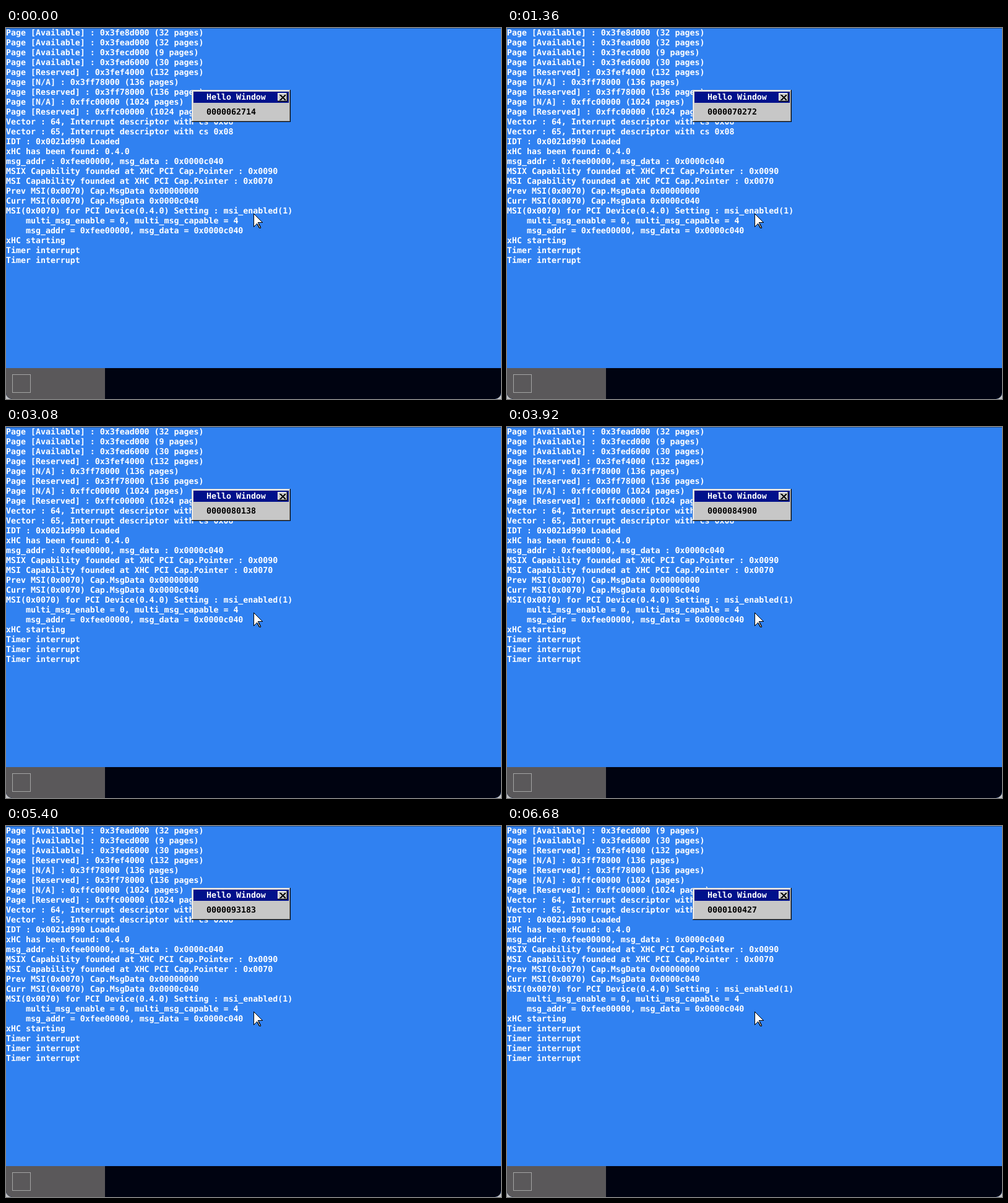
These frames come from a looping animation (800 by 600 pixels, 6.72 s). An HTML page:

```html
<!DOCTYPE html>
<html lang="en">
<head>
<meta charset="utf-8">
<title>Hello Window</title>
<style>
  html, body { margin: 0; width: 100%; height: 100%; overflow: hidden; background: #c4c4c6; }
  svg { display: block; width: 800px; height: 600px; }
  text {
    font: bold 13.288px "DejaVu Sans Mono", "Liberation Mono", monospace;
    white-space: pre;
    text-rendering: geometricPrecision;
    font-variant-ligatures: none;
  }
  #console { fill: #fff; }
</style>
</head>
<body>
<svg viewBox="0 0 800 600">
  <clipPath id="screen"><path d="M0 0H800V590A10 10 0 0 1 790 600H10A10 10 0 0 1 0 590Z"/></clipPath>
  <g clip-path="url(#screen)">
    <rect width="800" height="600" fill="#3081f1"/>
    <g id="console"></g>
    <rect width="800" height="1" fill="#1d4f94"/>
    <rect y="550" width="800" height="50" fill="#000311"/>
    <rect y="550" width="160" height="50" fill="#5a585a"/>
    <rect x="10.5" y="560.5" width="29" height="29" fill="none" stroke="#a5a5a5"/>
  </g>
  <g id="window" transform="translate(300 100)">
    <g id="frame" shape-rendering="crispEdges"></g>
    <path d="M142 8h2l3 3 3-3h2v1l-3.500 3.500 3.500 3.500v1h-2l-3-3-3 3h-2v-1l3.500-3.500-3.500-3.500z" fill="#000" shape-rendering="crispEdges"/>
    <text x="24" y="16" fill="#fff">Hello Window</text>
    <text id="counter" x="24" y="40" fill="#000"></text>
  </g>
  <path transform="translate(400.5 300.5)" shape-rendering="crispEdges" fill="#fff" stroke="#000"
    d="M0 0L14 14H7V15L8 16L11 22V23H9L6 17L5 16L4 17L0 21Z"/>
</svg>
<script>
const LOOP = 6720, STEP = 40, ROWS = 24, ROW_HEIGHT = 16;
const scrollTimes = [1720, 5600];
const counts = [[0, 62714], [1360, 70272], [2240, 75376], [3920, 84900],
                [4760, 89574], [5720, 94987], [6680, 100427]];

const log = `Page [Available] : 0x3fe8d000 (32 pages)
Page [Available] : 0x3fead000 (32 pages)
Page [Available] : 0x3fecd000 (9 pages)
Page [Available] : 0x3fed6000 (30 pages)
Page [Reserved] : 0x3fef4000 (132 pages)
Page [N/A] : 0x3ff78000 (136 pages)
Page [Reserved] : 0x3ff78000 (136 pages)
Page [N/A] : 0xffc00000 (1024 pages)
Page [Reserved] : 0xffc00000 (1024 pages)
Vector : 64, Interrupt descriptor with cs 0x08
Vector : 65, Interrupt descriptor with cs 0x08
IDT : 0x0021d990 Loaded
xHC has been found: 0.4.0
msg_addr : 0xfee00000, msg_data : 0x0000c040
MSIX Capability founded at XHC PCI Cap.Pointer : 0x0090
MSI Capability founded at XHC PCI Cap.Pointer : 0x0070
Prev MSI(0x0070) Cap.MsgData 0x00000000
Curr MSI(0x0070) Cap.MsgData 0x0000c040
MSI(0x0070) for PCI Device(0.4.0) Setting : msi_enabled(1)
    multi_msg_enable = 0, multi_msg_capable = 4
    msg_addr = 0xfee00000, msg_data = 0x0000c040
xHC starting`.split("\n").concat(Array(4).fill("Timer interrupt"));

const byId = id => document.getElementById(id);

function add(parent, tag, attrs) {
  const node = document.createElementNS("http://www.w3.org/2000/svg", tag);
  for (const key in attrs) node.setAttribute(key, attrs[key]);
  return parent.appendChild(node);
}

function box(x, y, width, height, fill) {
  add(byId("frame"), "rect", { x, y, width, height, fill });
}

// Raised bevel: light top and left, shaded bottom and right
function bevel(x, y, w, h, light, face) {
  box(x, y, w, h, "#000");
  box(x, y, w - 1, h - 1, "#848484");
  box(x, y, w - 2, h - 2, light);
  box(x + 1, y + 1, w - 3, h - 3, face);
}

box(0, 0, 160, 52, "#000");
box(0, 0, 159, 51, "#c7c7c7");
bevel(1, 1, 159, 51, "#fff", "#c7c7c7");
box(3, 3, 154, 18, "#00118b");
bevel(139, 5, 16, 14, "#fff", "#c7c7c7");

const lines = Array.from({ length: ROWS }, (_, row) =>
  add(byId("console"), "text", { x: 0, y: row * ROW_HEIGHT + 12 }));

function countAt(t) {
  let i = 1;
  while (i < counts.length - 1 && t > counts[i][0]) i++;
  const [t0, c0] = counts[i - 1], [t1, c1] = counts[i];
  return Math.round(c0 + (c1 - c0) * (t - t0) / (t1 - t0));
}

let shown = -1;
function draw() {
  const t = Math.floor(performance.now() % LOOP / STEP) * STEP;
  const scroll = scrollTimes.filter(time => t >= time).length;
  if (scroll !== shown) {
    lines.forEach((line, row) => { line.textContent = log[row + scroll]; });
    shown = scroll;
  }
  byId("counter").textContent = String(countAt(t)).padStart(10, "0");
  requestAnimationFrame(draw);
}
draw();
</script>
</body>
</html>
```
